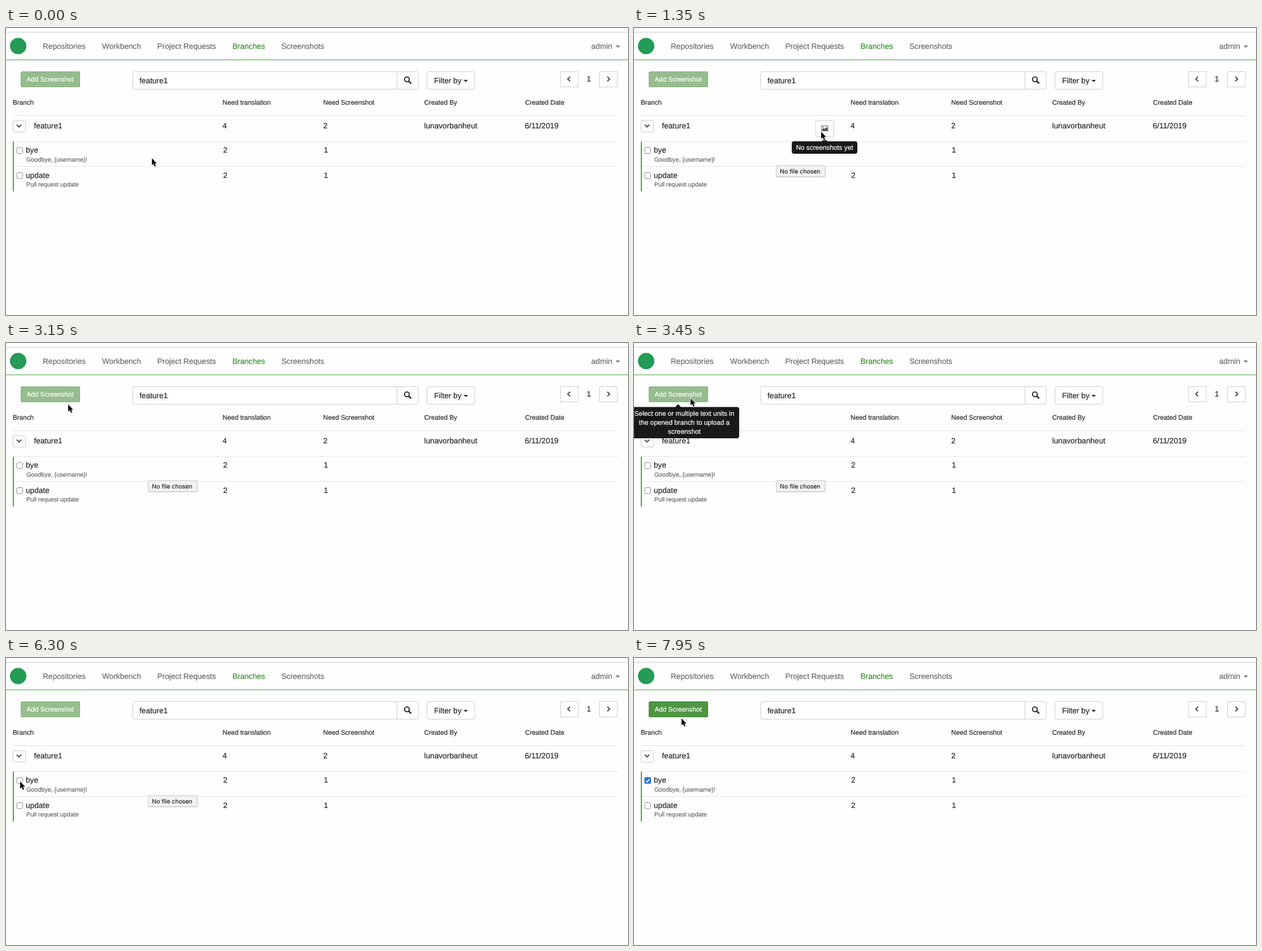
An HTML page that plays this animation: 1100 px wide and 509 px high, repeating every 8 s.

```html
<!DOCTYPE html>
<html lang="en">
<head>
<meta charset="utf-8">
<title>Branches</title>
<style>
  html, body { margin: 0; width: 100%; height: 100%; overflow: hidden; background: #fefefe; }
  svg { display: block; width: 100%; height: 100%; color: #2b2b2b; fill: #333;
        font: 13.65px "Liberation Sans", Arial, sans-serif; text-rendering: geometricPrecision; }
  text { fill: currentColor; stroke: currentColor; stroke-width: .22; }
  .nav { color: #6c6c6c; fill: #777; }
  .current { color: #36902c; }
  .head { font-size: 11.7px; }
  .sub { font-size: 10.75px; color: #6a6a6a; }
  .box { fill: #fff; stroke: #ccc; }
  .line { stroke: #e4e4e4; }
  .green { stroke: #4fa046; }
  .chevron { fill: none; stroke: #555; stroke-width: 2.2; }
  .light { color: #fff; }
  .tip { font-size: 11.82px; text-anchor: middle; }
  .bubble { fill: #000; opacity: .9; }
</style>
</head>
<body>
<svg viewBox="0 0 1100 509" preserveAspectRatio="none">
  <path d="M0 7.5H1100" stroke="#d0d0d0"/>
  <path class="green" d="M0 56.5H1100"/>
  <circle cx="21.5" cy="32" r="14.5" fill="#249b56"/>
  <g class="nav">
    <text x="65" y="37">Repositories</text>
    <text x="170" y="37">Workbench</text>
    <text x="267.5" y="37">Project Requests</text>
    <text x="400.5" y="37" class="current">Branches</text>
    <text x="487" y="37">Screenshots</text>
    <text x="1035" y="37">admin</text>
    <path d="M1078 31h8l-4 4z"/>
  </g>

  <rect id="add" x="26.5" y="77.5" width="104" height="27" rx="1.5"/>
  <text class="head light" x="36.5" y="95">Add Screenshot</text>

  <path class="box" d="M691.5 77.5H227a3 3 0 0 0-3 3v25a3 3 0 0 0 3 3H691.5zH726a3 3 0 0 1 3 3v25a3 3 0 0 1-3 3H691.5"/>
  <text x="236" y="98">feature1</text>
  <g fill="none" stroke="#333" stroke-width="2.1">
    <circle cx="709" cy="91" r="4.2"/>
    <path d="M712 94l4.5 4.5" stroke-width="2.8"/>
  </g>
  <rect class="box" x="744.5" y="77.5" width="84.5" height="31" rx="3"/>
  <text x="757" y="98">Filter by</text>
  <path d="M809 92h8l-4 4z"/>

  <rect class="box" x="980.5" y="77.5" width="31.5" height="27"/>
  <rect class="box" x="1049.5" y="77.5" width="31.5" height="27"/>
  <path class="chevron" d="M997.5 86.5l-4 4 4 4M1063.5 86.5l4 4-4 4"/>
  <text x="1027" y="95.2">1</text>

  <g class="head">
    <text x="12" y="135.7">Branch</text>
    <text x="383" y="135.7">Need translation</text>
    <text x="561" y="135.7">Need Screenshot</text>
    <text x="739.5" y="135.7">Created By</text>
    <text x="918" y="135.7">Created Date</text>
  </g>
  <path class="line" d="M12 155.5H1082M12 201.5H1082M14 245.5H1082"/>
  <path class="green" d="M13 201.5V290" stroke-width="2"/>

  <rect class="box" x="12.5" y="164.5" width="22" height="20" rx="1"/>
  <path class="chevron" d="M19 171.5l4 4 4-4"/>
  <text x="49.5" y="178.3">feature1</text>
  <text x="383" y="178.3">4</text>
  <text x="561" y="178.3">2</text>
  <text x="739.5" y="178.3">lunavorbanheut</text>
  <text x="917.5" y="178.3">6/11/2019</text>

  <rect x="19" y="212" width="10.5" height="10.5" rx="2" fill="#fff" stroke="#8a8a8a"/>
  <text x="35" y="221">bye</text>
  <text class="sub" x="36" y="236.8">Goodbye, {username}!</text>
  <text x="384" y="221">2</text>
  <text x="562" y="221">1</text>

  <rect x="19" y="256.5" width="10.5" height="10.5" rx="2" fill="#fff" stroke="#8a8a8a"/>
  <text x="35" y="265.7">update</text>
  <text class="sub" x="36" y="281.4">Pull request update</text>
  <text x="384" y="265.7">2</text>
  <text x="562" y="265.7">1</text>

  <g id="check">
    <rect x="18.5" y="211.5" width="11.5" height="11.5" rx="2" fill="#2374e8"/>
    <path d="M21 217.5l2.5 2.5 4-5.5" fill="none" stroke="#fff" stroke-width="1.7"/>
  </g>

  <g id="picture">
    <rect class="box" x="321.5" y="164.5" width="32" height="28" rx="1"/>
    <rect x="331.5" y="173.5" width="11.5" height="9" fill="#fff" stroke="#666"/>
    <path d="M332.5 182v-2l3-3 2 2 3-3.5 2 2.5v4z" fill="#555"/>
    <circle cx="334.5" cy="175.7" r="1" fill="#555"/>
  </g>

  <g id="fileTip">
    <rect x="251" y="245" width="88" height="20" rx="2" fill="#000" opacity=".1"/>
    <rect x="251.5" y="244" width="86.5" height="19.5" rx="1.5" fill="#f2f2f2" stroke="#c6c6c6"/>
    <text x="258" y="257.5" style="font: 10.5px Inter, sans-serif">No file chosen</text>
  </g>

  <g id="pictureTip" class="tip light">
    <path class="bubble" d="M283 201h49l5-5 5 5h49a4 4 0 0 1 4 4v14a4 4 0 0 1-4 4H283a4 4 0 0 1-4-4v-14a4 4 0 0 1 4-4z"/>
    <text x="337" y="215.5">No screenshots yet</text>
  </g>
  <g id="addTip" class="tip light">
    <path class="bubble" d="M-8 113.5H73l5-5 5 5h99a4 4 0 0 1 4 4v47.5a4 4 0 0 1-4 4H-8z"/>
    <text x="89" y="128.5">Select one or multiple text units in</text>
    <text x="89" y="145">the opened branch to upload a</text>
    <text x="89" y="161">screenshot</text>
  </g>

  <path id="cursor" d="M0 0V12.5l2.8-2.4 2 4.6 2.2-.9-2-4.6H8.8z" fill="#000" stroke="#fff" stroke-width="2" paint-order="stroke"/>
</svg>
<script>
const LOOP = 8000, STEP = 150;
const el = id => document.getElementById(id);

// Pointer stops: time, x, y
const path = [
  [0, 258, 231], [450, 282, 215], [750, 319, 190], [1050, 331, 184],
  [2550, 331, 184], [2700, 312, 179], [2850, 235, 152], [3000, 145, 120],
  [3150, 110, 109], [3300, 102, 100], [3450, 100, 98],
  [5400, 100, 98], [5550, 102, 104], [5700, 98, 138], [5850, 75, 188],
  [6000, 44, 226], [6150, 30, 234], [6300, 25, 219],
  [7050, 25, 219], [7200, 28, 213], [7350, 40, 190], [7500, 58, 155],
  [7800, 82, 111], [7950, 84, 107]
];

function pointer(t) {
  const i = path.findIndex(p => p[0] > t);
  if (i < 0) return path.at(-1).slice(1);
  const [a, b] = [path[i - 1], path[i]], k = (t - a[0]) / (b[0] - a[0]);
  return [a[1] + (b[1] - a[1]) * k, a[2] + (b[2] - a[2]) * k];
}

// Visible between two times, with one half-faded step at each end
function fade(t, from, to) {
  if (t < from || t > to) return 0;
  return t === from || t === to ? .5 : 1;
}

function draw(now) {
  const t = Math.floor(now % LOOP / STEP) * STEP;
  const [x, y] = pointer(t), checked = t >= 6600;
  el("cursor").setAttribute("transform", `translate(${x} ${y})`);
  el("picture").style.opacity = +(y >= 155 && y < 201);
  el("pictureTip").style.opacity = fade(t, 1200, 2700);
  el("addTip").style.opacity = fade(t, 3300, 5700);
  el("fileTip").style.opacity = fade(t, 150, 6600);
  el("check").style.opacity = +checked;
  el("add").style.fill = checked ? "#4f9643" : "#95bd8e";
  el("add").style.stroke = checked ? "#3e8034" : "#88b280";
  requestAnimationFrame(draw);
}
requestAnimationFrame(draw);
</script>
</body>
</html>
```
